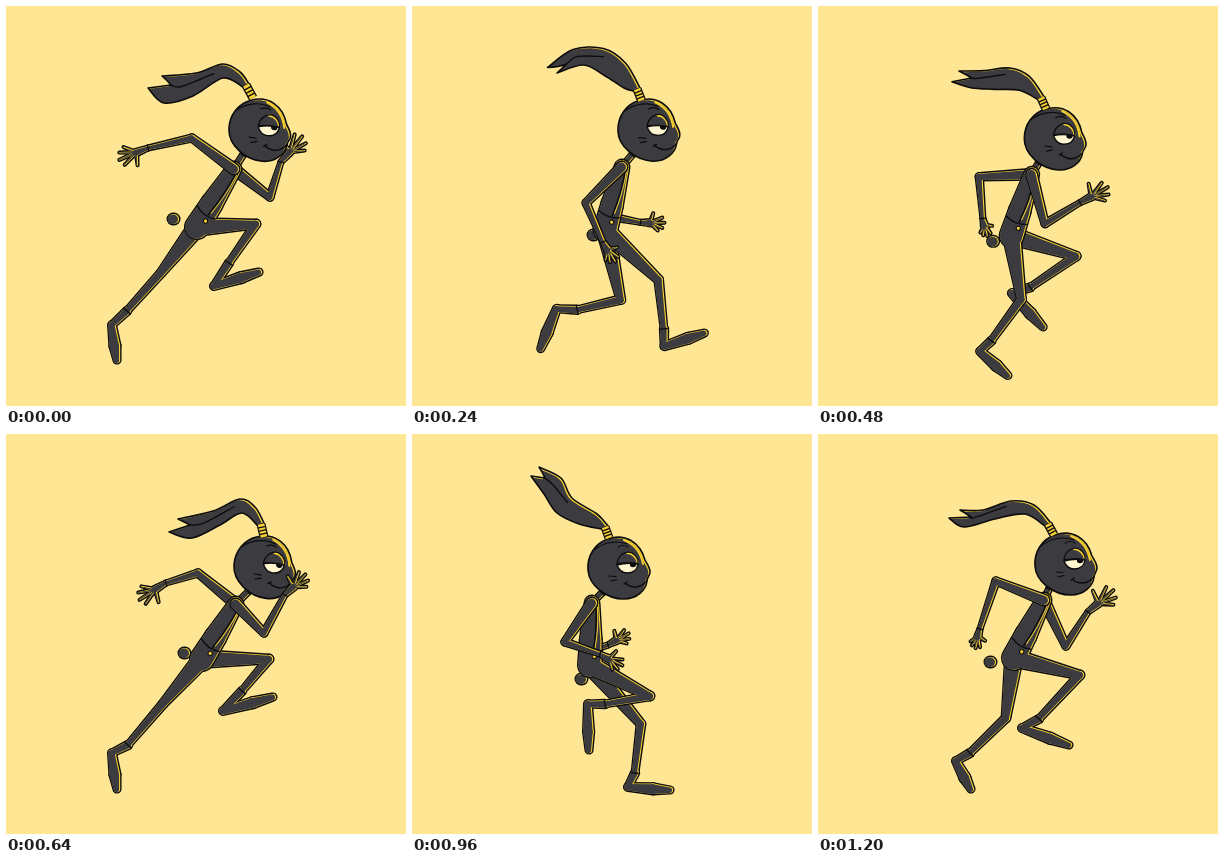
These frames come from a looping animation (400 by 400 pixels, 1280 ms). An HTML page with a canvas:

```html
<!DOCTYPE html>
<html lang="en">
<head>
<meta charset="utf-8">
<title>Runner</title>
<style>
  html, body { margin: 0; width: 100%; height: 100%; overflow: hidden; background: #fee695; }
  canvas { display: block; width: 100vw; height: 100vh; }
</style>
</head>
<body>
<canvas id="stage" width="400" height="400"></canvas>
<script>
const g = document.getElementById('stage').getContext('2d');
const PAPER = '#fee695', INK = '#0c0c0d', SKIN = '#3b3b40', GLOW = '#f6d033', EYE = '#fff5cf';
const STEP = 80, STEPS = 16;
const poses = [];

// Limbs list their joints outward: elbow, wrist, fingertip / knee, cuff, heel, toe.
function pose(at, p) {
  poses.push({ at, ...p });
}

pose(0, {
  head: [254, 124, .08], tie: [247, 92, 240, 79], tail: [167, 213], chest: [228, 163], hip: [191, 221],
  nearArm: [186, 132, 142, 142, 113, 153], farArm: [264, 191, 275, 156, 297, 131],
  nearLeg: [250, 218, 223, 257, 208, 280, 253, 266], farLeg: [155, 267, 121, 305, 106, 319, 111, 354],
  hair: [234, 66, 217, 58, 190, 67, 156, 70, 165, 79, 142, 82, 158, 97, 187, 90, 217, 72]
});
pose(2, {
  head: [270, 114, 0], tie: [259, 86, 253, 75], tail: [194, 212], chest: [243, 153], hip: [210, 211],
  nearArm: [193, 158, 177, 198, 167, 213], farArm: [256, 199, 289, 189, 320, 179],
  nearLeg: [268, 256, 290, 296, 298, 315, 328, 293], farLeg: [160, 268, 119, 281, 97, 280, 72, 321],
  hair: [237, 49, 205, 37, 167, 49, 144, 84, 166, 70, 162, 79, 189, 63, 222, 63, 246, 75]
});
pose(4, {
  head: [204, 134, .08], tie: [200, 103, 197, 91], tail: [168, 246], chest: [177, 169], hip: [177, 237],
  nearArm: [172, 220, 211, 235, 239, 233], farArm: [143, 211, 162, 226, 176, 232],
  nearLeg: [225, 291, 210, 342, 205, 355, 252, 355], farLeg: [238, 264, 192, 271, 173, 270, 165, 307],
  hair: [190, 65, 178, 48, 155, 38, 127, 39, 143, 46, 128, 55, 154, 55, 163, 76, 178, 89]
});
pose(8, {
  head: [259, 133, .12], tie: [258, 103, 255, 90], tail: [178, 219], chest: [230, 170], hip: [196, 225],
  nearArm: [258, 199, 279, 161, 300, 141], farArm: [192, 139, 160, 149, 133, 165],
  nearLeg: [157, 270, 122, 311, 106, 319, 111, 355], farLeg: [263, 225, 236, 257, 217, 277, 267, 263],
  hair: [249, 73, 234, 65, 207, 77, 172, 85, 184, 91, 163, 98, 186, 104, 214, 91, 236, 79]
});
pose(10, {
  head: [271, 113, .06], tie: [264, 84, 259, 73], tail: [190, 211], chest: [238, 157], hip: [212, 211],
  nearArm: [250, 194, 290, 189, 318, 182], farArm: [193, 165, 187, 206, 184, 227],
  nearLeg: [160, 263, 112, 278, 92, 281, 74, 312], farLeg: [269, 256, 288, 293, 293, 310, 329, 278],
  hair: [248, 55, 224, 40, 192, 41, 164, 57, 182, 51, 168, 58, 192, 54, 212, 65, 240, 70]
});
pose(12, {
  head: [207, 134, 0], tie: [197, 104, 193, 93], tail: [169, 245], chest: [180, 169], hip: [178, 231],
  nearArm: [153, 208, 188, 220, 210, 232], farArm: [180, 216, 196, 211, 217, 200],
  nearLeg: [238, 262, 193, 270, 176, 270, 177, 316], farLeg: [229, 290, 223, 339, 216, 353, 258, 356],
  hair: [185, 80, 160, 64, 149, 44, 127, 33, 133, 44, 119, 42, 132, 60, 145, 79, 167, 90]
});
pose(15, {
  head: [248, 130, 0], tie: [236, 101, 230, 90], tail: [172, 228], chest: [226, 166], hip: [196, 224],
  nearArm: [178, 147, 162, 195, 157, 214], farArm: [248, 212, 270, 178, 296, 157],
  nearLeg: [262, 241, 221, 285, 204, 294, 251, 311], farLeg: [188, 284, 152, 319, 138, 327, 153, 355],
  hair: [216, 71, 193, 67, 165, 76, 142, 76, 153, 83, 131, 84, 146, 93, 177, 85, 207, 80]
});

// The opposite push-off is the last pose with its sides swapped.
const move = (a, dx, dy) => a.map((v, i) => v + (i % 2 ? dy : dx));
const push = poses[poses.length - 1], opposite = {};
for (const k of ['tie', 'tail', 'chest', 'hip', 'hair']) opposite[k] = move(push[k], 6, 2);
for (const k of ['Arm', 'Leg']) {
  opposite['near' + k] = move(push['far' + k], 6, 2);
  opposite['far' + k] = move(push['near' + k], 6, 2);
}
opposite.head = [254, 132, .06];
pose(7, opposite);
poses.sort((a, b) => a.at - b.at);

const lerp = (a, b, t) => a + (b - a) * t;
const mix = (a, b, t) => a.map((v, i) => lerp(v, b[i], t));
const pairs = a => a.reduce((out, v, i) => (i % 2 ? out[out.length - 1].push(v) : out.push([v]), out), []);

function bones(root, flat) {
  let last = root;
  return pairs(flat).map(p => {
    const dx = p[0] - last[0], dy = p[1] - last[1];
    last = p;
    return [Math.hypot(dx, dy), Math.atan2(dy, dx)];
  });
}

// Swing each bone through the shorter arc so limbs keep their length.
function swing(a, b, root, key, limb, t) {
  const from = bones(a[root], a[limb]), to = bones(b[root], b[limb]);
  let [x, y] = key;
  const pts = [[x, y]];
  from.forEach(([len, ang], i) => {
    const d = to[i][1] - ang;
    const dir = ang + Math.atan2(Math.sin(d), Math.cos(d)) * t;
    const l = lerp(len, to[i][0], t);
    pts.push([x += l * Math.cos(dir), y += l * Math.sin(dir)]);
  });
  return pts;
}

function poseAt(n) {
  let i = poses.length - 1;
  while (poses[i].at > n) i--;
  const a = poses[i], b = poses[(i + 1) % poses.length];
  const t = (n - a.at) / ((b.at - a.at + STEPS) % STEPS);
  const p = {};
  for (const k of ['head', 'tie', 'tail', 'chest', 'hip', 'hair']) p[k] = mix(a[k], b[k], t);
  for (const side of ['near', 'far']) {
    p[side + 'Arm'] = swing(a, b, 'chest', p.chest, side + 'Arm', t);
    p[side + 'Leg'] = swing(a, b, 'hip', p.hip, side + 'Leg', t);
  }
  return p;
}

// --- drawing helpers ---
const chain = (pts, radii) => pts.slice(1).map((p, i) => [pts[i], radii[i], p, radii[i + 1]]);

function fillCaps(caps, inset, dx, dy, color) {
  g.fillStyle = color;
  for (const [p, r, q, s] of caps) {
    const a = Math.atan2(q[1] - p[1], q[0] - p[0]), h = Math.PI / 2;
    g.beginPath();
    g.arc(p[0] + dx, p[1] + dy, Math.max(.3, r - inset), a + h, a + 3 * h);
    g.arc(q[0] + dx, q[1] + dy, Math.max(.3, s - inset), a - h, a + h);
    g.fill();
  }
}

function inkCaps(caps) {
  fillCaps(caps, 0, 0, 0, INK);
  fillCaps(caps, 1.4, 0, 0, GLOW);
  fillCaps(caps, 1.8, -.7, .3, SKIN);
}

function inkBlob(path) {
  g.fillStyle = GLOW;
  g.fill(path);
  g.save();
  g.clip(path);
  g.translate(-1.7, 1.2);
  g.fillStyle = SKIN;
  g.fill(path);
  g.restore();
  line(path, 1.6);
}

function line(path, width, color = INK) {
  g.lineWidth = width;
  g.strokeStyle = color;
  g.stroke(path);
}

function spline(path, pts) {
  for (let i = 0; i < pts.length - 1; i++) {
    const a = pts[i - 1] || pts[i], b = pts[i], c = pts[i + 1], d = pts[i + 2] || c;
    path.bezierCurveTo(b[0] + (c[0] - a[0]) / 6, b[1] + (c[1] - a[1]) / 6,
      c[0] - (d[0] - b[0]) / 6, c[1] - (d[1] - b[1]) / 6, c[0], c[1]);
  }
}

// --- body parts ---
function arm([shoulder, elbow, wrist, tip]) {
  const a = Math.atan2(tip[1] - wrist[1], tip[0] - wrist[0]);
  const len = Math.max(18, Math.hypot(tip[0] - wrist[0], tip[1] - wrist[1]));
  const reach = (p, dir, l) => [p[0] + l * Math.cos(dir), p[1] + l * Math.sin(dir)];
  const palm = reach(wrist, a, len * .4);
  const caps = chain([shoulder, elbow, wrist, palm], [6.5, 4.7, 3.5, 4.8]);
  [-.45, -.05, .35, .75].forEach((turn, i) =>
    caps.push([palm, 2.6, reach(palm, a + turn, len * [.55, .6, .55, .45][i]), 2]));
  caps.push([palm, 2.8, reach(palm, a - 1.3, len * .42), 2]);
  inkCaps(caps);
  crease(elbow, wrist, 3);
}

// A short line across the end of a bone.
function crease(p, q, half) {
  const l = Math.hypot(q[0] - p[0], q[1] - p[1]) || 1;
  const nx = -(q[1] - p[1]) / l * half, ny = (q[0] - p[0]) / l * half;
  line(new Path2D(`M${q[0] - nx} ${q[1] - ny}L${q[0] + nx} ${q[1] + ny}`), 1.3);
}

function legCaps([hip, knee, cuff, heel, toe]) {
  const ball = [lerp(heel[0], toe[0], .6), lerp(heel[1], toe[1], .6)];
  return [...chain([hip, knee, cuff], [10, 5.4, 4.4]),
    ...chain([cuff, heel], [5.2, 4.6]), ...chain([heel, ball, toe], [5, 6.6, 4.6])];
}

function torso(p) {
  const [cx, cy] = p.chest, [hx, hy] = p.hip;
  const waist = [lerp(cx, hx, .6), lerp(cy, hy, .6)];
  inkCaps([...chain([p.chest, waist, p.hip], [8.5, 12, 13]), ...legCaps(p.nearLeg)]);
  crease(p.nearLeg[1], p.nearLeg[2], 4.5);
  g.save();
  g.translate(cx, cy);
  g.rotate(Math.atan2(hy - cy, hx - cx));
  const l = Math.hypot(hx - cx, hy - cy);
  line(new Path2D(`M0 -4Q${l * .4} -6 ${l * .76} -3`), 1.5);
  line(new Path2D(`M4 -5.6Q${l * .4} -7.6 ${l * .72} -4.6`), 1, GLOW);
  line(new Path2D(`M${l * .74} 11Q${l * .83} 0 ${l * .76} -11`), 1.4);
  g.beginPath();
  g.arc(l * .86, -4, 2.1, 0, 7);
  g.fillStyle = GLOW;
  g.fill();
  g.lineWidth = 1;
  g.stroke();
  g.restore();
}

function hair(p) {
  const root = p.tie.slice(2), [a, b, c, tip, notch, tip2, d, e, f] = pairs(p.hair);
  const top = [root[0] + 3, root[1] - 1], low = [root[0] - 3, root[1] + 2];
  const path = new Path2D();
  path.moveTo(...top);
  spline(path, [top, a, b, c, tip]);
  path.quadraticCurveTo(lerp(tip[0], notch[0], .6), lerp(tip[1], notch[1], .4) + 1, ...notch);
  path.lineTo(...tip2);
  spline(path, [tip2, d, e, f, low]);
  path.closePath();
  inkBlob(path);
  const strand = new Path2D();
  strand.moveTo(...notch);
  spline(strand, [notch, mix(c, d, .45), mix(b, e, .3)]);
  line(strand, 1.3);
}

function tie([x, y, u, v]) {
  const band = (w, color) => line(new Path2D(`M${x} ${y}L${u} ${v}`), w, color);
  g.lineCap = 'butt';
  band(9, INK);
  band(6.6, GLOW);
  for (const t of [.25, .5, .75]) crease([x, y], [lerp(x, u, t), lerp(y, v, t)], 4);
  g.lineCap = 'round';
}

function head([x, y, tilt]) {
  g.save();
  g.translate(x, y);
  g.rotate(tilt);
  inkBlob(new Path2D('M-11 -29C6 -35 21 -26 26 -8C28 -4 31 -1 31 4C31 8 28 9 28 13' +
    'C27 22 18 31 5 31C-12 31 -30 18 -31 2C-32 -12 -24 -25 -11 -29Z'));
  line(new Path2D('M5 -28C15 -24 22 -15 24 -4'), 2, GLOW);
  line(new Path2D('M-25 -18C-15 -26 -2 -28 8 -24'), 1.2);
  line(new Path2D('M-1 -21Q4 -24 9 -21'), 1.2);
  const lid = new Path2D('M-2 -4C-1 -13 7 -18 13 -15C18 -12 20 -7 19 -4Q8 -6 -2 -4Z');
  g.fillStyle = SKIN;
  g.fill(lid);
  line(new Path2D('M8 -15C14 -15 18 -10 19 -5'), 2.2, GLOW);
  line(lid, 1.3);
  const white = new Path2D('M-2 -3Q8 -6 19 -4C18 3 13 5 8 5C3 5 0 2 -2 -3Z');
  g.fillStyle = EYE;
  g.fill(white);
  line(white, 1.4);
  g.save();
  g.clip(white);
  g.beginPath();
  g.arc(14, -4, 3.2, 0, 7);
  g.fillStyle = INK;
  g.fill();
  g.restore();
  line(new Path2D('M-10 8L-3 8.500M-8 13L-2 11.500'), 1.2);
  line(new Path2D('M6 15C10 19 17 20 21 18Q26 16 28 12M5 16L8 14'), 1.4);
  g.restore();
}

function draw(n) {
  const p = poseAt(n), [hx, hy] = p.head, neck = [hx - 17, hy + 25];
  g.fillStyle = PAPER;
  g.fillRect(0, 0, 400, 400);
  g.lineCap = g.lineJoin = 'round';
  inkCaps([[p.tail, 6.5, [p.tail[0] + 1, p.tail[1]], 6.5]]);
  arm(p.farArm);
  inkCaps(legCaps(p.farLeg));
  crease(p.farLeg[1], p.farLeg[2], 4.5);
  inkCaps([[p.chest, 4, neck, 4]]);
  crease(p.chest, neck, 3.5);
  torso(p);
  hair(p);
  head(p.head);
  tie(p.tie);
  arm(p.nearArm);
}

let shown = -1;
function tick(now) {
  const n = Math.floor(now / STEP) % STEPS;
  if (n !== shown) draw(shown = n);
  requestAnimationFrame(tick);
}
draw(0);
requestAnimationFrame(tick);
</script>
</body>
</html>
```
